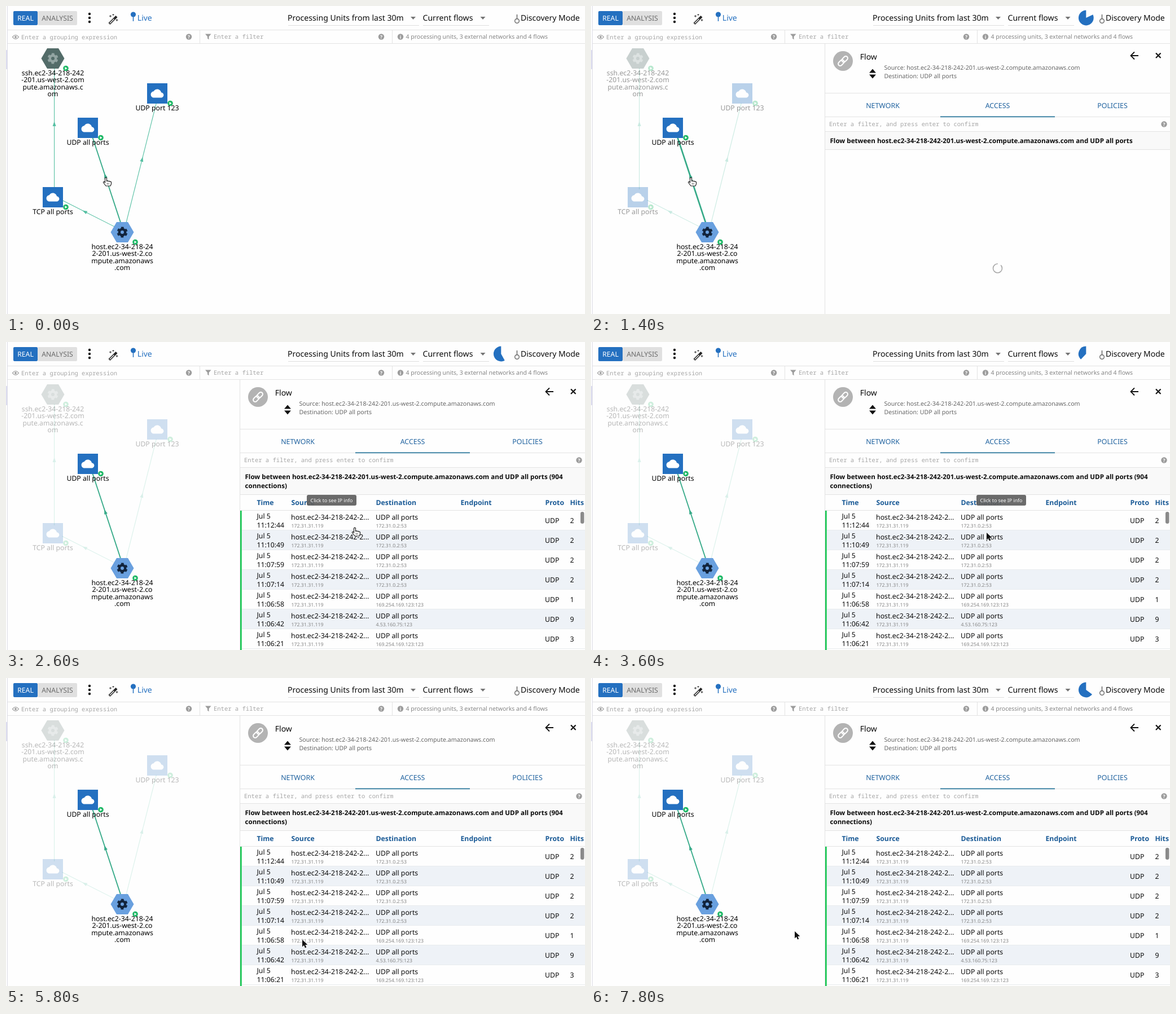
An HTML page that plays this animation: 1026 by 546 pixels, repeating every 8000 ms.

```html
<!DOCTYPE html>
<html lang="en">
<head>
<meta charset="utf-8">
<title>Flow access log</title>
<style>
html, body { margin: 0; width: 100%; height: 100%; overflow: hidden; background: #fefefe; }
svg { display: block; width: 1026px; height: 546px; font-family: "Noto Sans", "Open Sans", sans-serif; text-rendering: geometricPrecision; }
text { white-space: pre; }
.mono { font-family: "Noto Sans Mono", "DejaVu Sans Mono", monospace; }
.dim .shape { opacity: var(--shape); }
.dim .label { opacity: var(--label); }
</style>
</head>
<body>
<svg id="stage" viewBox="0 0 1026 546"></svg>
<script>
const BLUE = '#2470c0', GREY = '#9c9c9c', RULE = '#e3e3e3', INK = '#0a0a0a';
const stage = document.getElementById('stage');

// Markup helpers
const text = (x, y, size, fill, str, attrs = '') =>
  `<text x="${x}" y="${y}" font-size="${size}" fill="${fill}" ${attrs}>${str}</text>`;
const rect = (x, y, w, h, fill, attrs = '') =>
  `<rect x="${x}" y="${y}" width="${w}" height="${h}" fill="${fill}" ${attrs}/>`;
const circle = (x, y, r, fill, attrs = '') => `<circle cx="${x}" cy="${y}" r="${r}" fill="${fill}" ${attrs}/>`;
const path = (d, fill, attrs = '') => `<path d="${d}" fill="${fill}" ${attrs}/>`;
const line = (d, stroke, width = 1, attrs = '') => path(d, 'none', `stroke="${stroke}" stroke-width="${width}" ${attrs}`);
const group = (attrs, ...parts) => `<g ${attrs}>${parts.join('')}</g>`;
const MID = 'text-anchor="middle"', BOLD = 'font-weight="700"', MONO = 'class="mono"';
const badge = (x, y, char) => circle(x, y, 5.2, GREY) + text(x, y + 3, 8.5, '#fff', char, `${MID} ${BOLD}`);

function toolbar() {
  const caret = x => path(`M${x - 4.5} 19h9l-4.5 5z`, '#757575');
  return [
    rect(13, 9, 43, 25, BLUE, 'rx="2"'), rect(56, 9, 70, 25, '#e0e0e0', 'rx="2"'),
    text(34.5, 25.5, 12.25, '#fff', 'REAL', MID), text(91, 25.5, 12.25, '#6b6b6b', 'ANALYSIS', MID),
    ...[14, 21, 28].map(y => circle(148, y, 2.2, '#111')),
    line('M183 31.500l13-13', '#222', 4), line('M184 30.500l7.500-7.500', '#fff', 1.3),
    line('M185 16v4M183 18h4M190 14v3M188.500 15.500h3M196.500 23v4M194.500 25h4', '#333', 1),
    line('M225.500 15v12', BLUE, 1.5), circle(225.5, 15, 4.6, BLUE),
    text(232.8, 26, 14, BLUE, 'Live'),
    text(499, 26, 14.1, INK, 'Processing Units from last 30m'), caret(721.5),
    text(738.5, 26, 14.1, INK, 'Current flows'), caret(845),
    line('M500 34.500h232M739 34.500h117', '#dedede'),
    line('M905.500 15v7', '#666', 1.5), circle(905.5, 26.5, 3.8, '#fff', 'stroke="#666" stroke-width="1.4"'),
    text(912, 26, 14, INK, 'Discovery Mode'),
    line('M3 42.500h1023M3 66.500h1023M343.500 43v23M684.500 43v23', RULE),
    line('M11.500 55q5.500-7 11 0q-5.500 7-11 0z', GREY, 1.2), circle(17, 55, 1.9, GREY),
    text(27, 58.5, 10.5, '#a6a6a6', 'Enter a grouping expression', MONO), badge(324, 54.5, '?'),
    path('M353 49.500h10.500l-4 4.700v5.300l-2.500-2v-3.300z', GREY),
    text(368, 57.5, 10.5, '#a6a6a6', 'Enter a filter', MONO), badge(665, 54.5, '?'),
    badge(699, 54.5, 'i'), text(708.5, 58, 10.5, '#858585', '4 processing units, 3 external networks and 4 flows'),
    rect(0, 78, 2, 34, '#dcdcf0'), line('M2.500 0v546', '#dcdce4'),
  ].join('');
}

const NODES = {
  ssh: { x: 83, y: 93, hex: '#536c69', gear: '#93a5a3', dim: true,
    label: ['ssh.ec2-34-218-242', '-201.us-west-2.com', 'pute.amazonaws.c', 'om'] },
  ntp: { x: 268, y: 155, dim: true, label: ['UDP port 123'] },
  udp: { x: 145, y: 216, label: ['UDP all ports'] },
  tcp: { x: 83, y: 339, dim: true, label: ['TCP all ports'] },
  host: { x: 206, y: 401, hex: '#69a0df', gear: '#12243c',
    label: ['host.ec2-34-218-24', '2-201.us-west-2.co', 'mpute.amazonaws', '.com'] },
};
const CLOUD = 'M19.35 10.04C18.67 6.59 15.64 4 12 4 9.11 4 6.6 5.64 5.35 8.04 2.34 8.36 0 10.91 0 14c0 3.31 2.69 6 6 6h13c2.76 0 5-2.24 5-5 0-2.64-2.05-4.78-4.65-4.96z';

function node({ x, y, hex, gear, dim, label }) {
  const icon = hex
    ? path('M-20.500 0L-10-18H10L20.500 0L10 18H-10z', hex) +
      circle(0, 0, 5.2, 'none', `stroke="${gear}" stroke-width="4.400"`) +
      circle(0, 0, 8, 'none', `stroke="${gear}" stroke-width="3" stroke-dasharray="4.600 3.778" transform="rotate(14)"`)
    : rect(-18, -18, 36, 36, BLUE) + path(CLOUD, '#fff', 'transform="scale(.95) translate(-12 -12)"');
  const status = circle(23, 17.5, 4.8, '#1fb866') + path('M21.500 15l4 2.500l-4 2.500z', '#fff');
  return group(`transform="translate(${x} ${y})" class="${dim ? 'dim' : ''}"`,
    group('class="shape"', icon, status),
    group('class="label"', ...label.map((s, i) => text(0, 30 + i * 12.25, 12.25, '#000', s, MID))));
}

// Edges run beside the centre line, with an arrow just past the middle.
function edge(from, to, main) {
  const a = NODES[from], b = NODES[to], dx = b.x - a.x, dy = b.y - a.y;
  const len = Math.hypot(dx, dy), mid = len / 2, color = main ? '#36aa88' : '#55bfa2';
  return group(`class="${main ? '' : 'dim'}" transform="translate(${a.x} ${a.y}) rotate(${Math.atan2(dy, dx) * 180 / Math.PI})"`,
    group('class="shape"',
      line(`M14 2.600H${len - 17}`, color, 1.1, main ? 'id="mainEdge"' : ''),
      path(`M${mid + 3} -.400l8.500 3l-8.500 3z`, color)));
}

const HOST = 'host.ec2-34-218-242-201.us-west-2.compute.amazonaws.com';
const SHORT = 'host.ec2-34-218-242-2...';
const DNS = '172.31.0.2:53', TIME = '169.254.169.123:123';
const ROWS = [['12:44', DNS, 2], ['10:49', DNS, 2], ['07:59', DNS, 2], ['07:14', DNS, 2],
  ['06:58', TIME, 1], ['06:42', '4.53.160.75:123', 9], ['06:21', TIME, 3]];
const TITLE = `Flow between ${HOST} and UDP all ports`;

function panel() {
  return [
    rect(415, 67, 611, 479, '#fefefe'), line('M414.500 67v479', RULE),
    circle(446.5, 97.5, 17.5, '#b3b3b3'),
    group('transform="translate(446.500 97.500) rotate(-45)" fill="none" stroke="#fff" stroke-width="2"',
      '<rect x="-10.500" y="-3.500" width="12" height="7" rx="3.500"/><rect x="-1.500" y="-3.500" width="12" height="7" rx="3.500"/>'),
    text(476.8, 95, 14, INK, 'Flow'),
    path('M493 118.500l6-7l6 7zM493 121.500h12l-6 7z', '#111'),
    text(519.5, 112.5, 10.65, '#666', `Source: ${HOST}`), text(519.5, 127.5, 10.65, '#666', 'Destination: UDP all ports'),
    line('M970 88h-13M963 81.500l-6.500 6.500l6.500 6.500', '#111', 1.8),
    line('M1001 83.500l8.500 8.500M1009.500 83.500l-8.500 8.500', '#111', 2.2),
    ...['NETWORK', 'ACCESS', 'POLICIES'].map((s, i) => text(517 + i * 203.5, 180.5, 12.4, '#1f629f', s, MID)),
    line('M415 154.500h611M415 196.500h611M415 222.500h611', RULE), rect(619, 195.5, 203, 1.7, '#257397'),
    text(422, 212.5, 10.5, '#a6a6a6', 'Enter a filter, and press enter to confirm', MONO), badge(1015.5, 209.5, '?'),
    group('id="loading"',
      rect(415, 223, 611, 31, '#f9f9f9'), line('M415 254.500h611', RULE),
      text(423.5, 243, 11.62, INK, TITLE, BOLD),
      circle(720.5, 465, 8, 'none', 'id="spinner" stroke="#a8a8a8" stroke-width="1.600" stroke-dasharray="44 6.270"')),
    group('id="table"', table()),
  ].join('');
}

function table() {
  const heads = { Time: 445, Source: 506, Destination: 656, Endpoint: 806, Proto: 956, Hits: 1000 };
  const row = ([time, dest, hits], i) => group(`transform="translate(0 ${299 + i * 35})"`,
    i % 2 ? rect(418, 0, 608, 35, '#eef2f7') : '', line('M418 34.500h608', '#e8ebee'),
    text(444.5, 13.6, 12.25, INK, 'Jul 5'), text(444.5, 30.3, 12.25, INK, `11:${time}`),
    text(505, 16.1, 12.37, INK, SHORT), text(505.5, 29.6, 8.75, '#858585', '172.31.31.119'),
    text(655, 16.1, 12.25, INK, 'UDP all ports'), text(655.5, 29.6, 8.75, '#858585', dest),
    text(955, 22.3, 12.25, INK, 'UDP'), text(999.5, 22.3, 12.25, INK, hits));
  return [
    rect(415, 223, 611, 48, '#f9f9f9'), line('M415 270.500h611M415 298.500h611', RULE),
    text(423.5, 243, 11.62, INK, `${TITLE} (904`, BOLD), text(423.5, 259, 11.62, INK, 'connections)', BOLD),
    ...Object.entries(heads).map(([s, x]) => text(x - .5, 289, 12.25, '#1a5a96', s, BOLD)),
    ...ROWS.map(row),
    rect(415, 299, 2.7, 247, '#18c653'), rect(1018, 301, 6.5, 21, '#8a8a8a', 'rx="3.200"'),
  ].join('');
}

const HAND = 'M-1.500 1.200Q0-1 1.500 1.200V6.500Q3 5 4.300 6.800Q6 5.500 7 7.400Q9 6.500 9.500 8.500V11.500L8 15H0L-4.500 9Q-4.700 7-2.800 7.500L-1.500 9z';
const ARROW = 'M0 0V12.500L3 9.800L5 14.500L7.300 13.500L5.300 9L9.300 8.800z';

stage.innerHTML = toolbar() +
  edge('tcp', 'ssh') + edge('host', 'tcp') + edge('host', 'ntp') + edge('host', 'udp', true) +
  Object.values(NODES).map(node).join('') +
  group('id="panel"', panel()) + path('', BLUE, 'id="pie"') + group('id="tips"') +
  group('id="cursor"',
    group('id="hand"', path(HAND, '#fff', 'stroke="#222" stroke-width="1.200" stroke-linejoin="round"'), line('M2.500 9.500v3M5 9.500v3', '#222', .8)),
    path(ARROW, '#111', 'id="arrow" stroke="#fff" stroke-width="1" paint-order="stroke"'));

const part = id => document.getElementById(id);
const show = (id, on) => part(id).style.display = on ? '' : 'none';
const set = (id, name, value) => part(id).setAttribute(name, value);

// Pointer tip: time, x, y
const MOVES = [[0, 177, 304], [1600, 177, 304], [2400, 618, 329], [2600, 618, 329], [3000, 697, 327], [3600, 701, 338],
  [4000, 700, 342], [4800, 698, 447], [5200, 690, 458], [6000, 470, 466], [6600, 467, 466], [7200, 448, 470], [7800, 361, 449]];
const ARROW_TIMES = [[1800, 2400], [3400, 4200], [5400, 6000], [7000, 8000]];
// Tooltips: start, end, centre x, centre y, opacity
const TIPS = [[2400, 3000, 577, 280.5, .93], [3000, 3800, 727, 280.5, .93], [4200, 4600, 727, 315.5, .8], [4600, 4800, 727, 350.5, .8],
  [4800, 5000, 727, 352, .08], [4800, 5000, 727, 385.5, .65], [5000, 5600, 727, 420.5, .93], [6000, 7000, 470.5, 418, .93]];
const within = (t, [from, to]) => t >= from && t < to;

function pointerAt(t) {
  const i = MOVES.findIndex(m => m[0] > t);
  if (i < 0) return MOVES.at(-1).slice(1);
  const a = MOVES[i - 1], b = MOVES[i], k = (t - a[0]) / (b[0] - a[0]);
  return [1, 2].map(j => a[j] + (b[j] - a[j]) * k);
}

// Five-second countdown: the wedge that is left ends at twelve o'clock.
function pieAt(t) {
  const age = t >= 6000 ? t - 6040 : t - 500;
  if (age < -100 || age >= 5000) return '';
  const angle = Math.max(age, 10) * .072 * Math.PI / 180, r = age < 0 ? 9 : 13.4;
  const x = 877.3 + r * Math.sin(angle), y = 21 - r * Math.cos(angle);
  return `M877.3 21L${x} ${y}A${r} ${r} 0 ${angle < Math.PI ? 1 : 0} 1 877.3 ${21 - r}z`;
}

function tip([, , x, y, opacity]) {
  const time = x < 500, w = time ? 95 : 88;
  return group(`opacity="${opacity}"`, rect(x - w / 2, y - 9.5, w, 19, '#606060', 'rx="3"'),
    text(x, y + 3, 8.75, '#fff', time ? 'Click to see full time' : 'Click to see IP info', MID));
}

let last = -1;
function draw() {
  const t = Math.floor(performance.now() % 8000 / 200) * 200;
  if (t !== last) {
    last = t;
    const loaded = t >= 1800, selected = t >= 600;
    stage.style.setProperty('--shape', loaded ? .21 : selected ? .31 : 1);
    stage.style.setProperty('--label', loaded ? .28 : selected ? .4 : 1);
    set('mainEdge', 'stroke-width', loaded ? 1.8 : selected ? 2.7 : 1.8);
    show('panel', selected);
    set('panel', 'transform', `translate(${t === 600 ? 330 : t === 800 ? 60 : 0} 0)`);
    show('loading', !loaded);
    show('table', loaded);
    set('spinner', 'transform', `rotate(${(t - 1400) * .36 - 45} 720.5 465)`);
    set('pie', 'd', pieAt(t));
    part('tips').innerHTML = TIPS.filter(p => within(t, p)).map(tip).join('');
    const arrow = ARROW_TIMES.some(p => within(t, p));
    show('arrow', arrow);
    show('hand', !arrow);
    set('cursor', 'transform', `translate(${pointerAt(t)})`);
  }
  requestAnimationFrame(draw);
}
draw();
</script>
</body>
</html>
```
